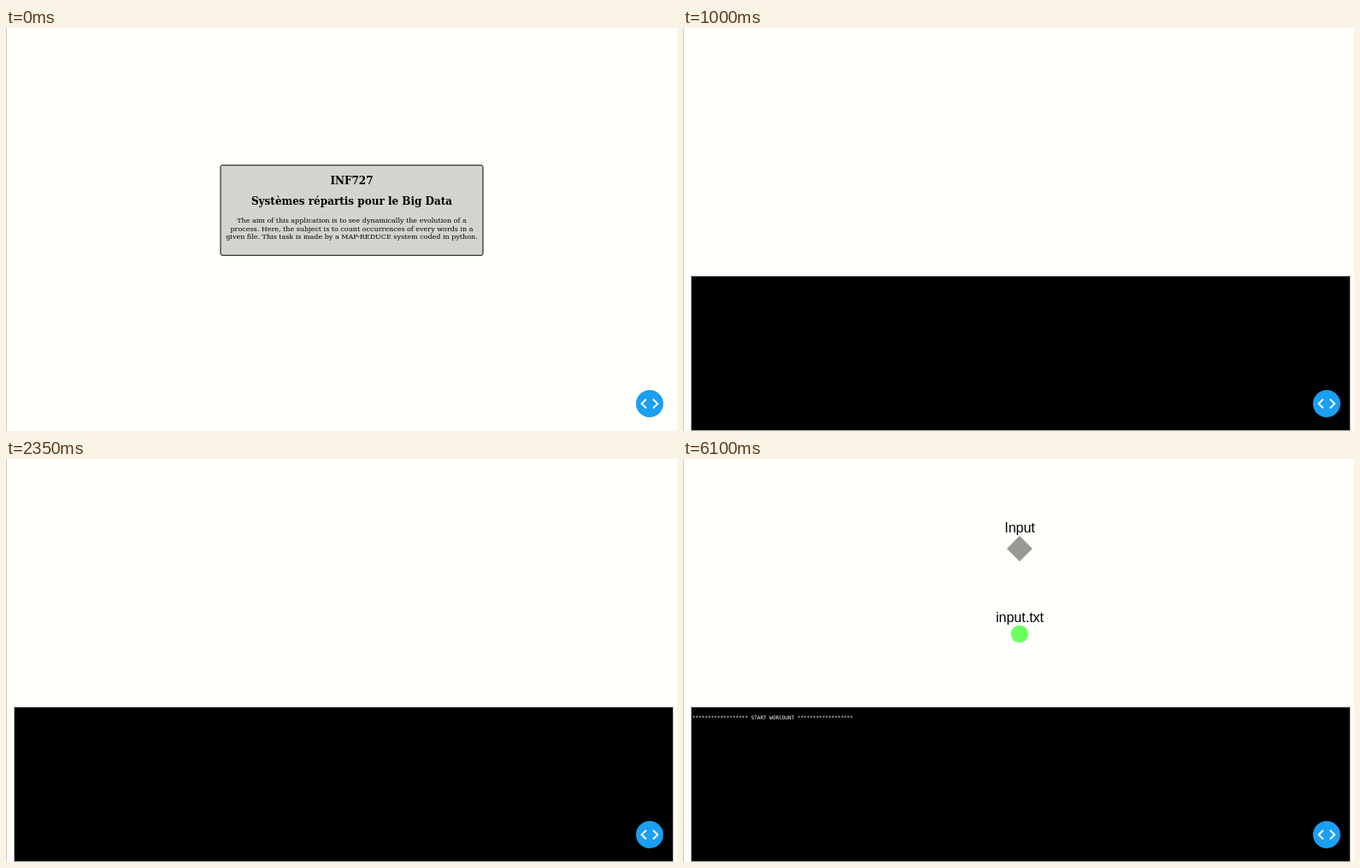
Recreate the animation shown at these times as an HTML page. Size 785 by 472 pixels, loop 8 s.

```html
<!DOCTYPE html>
<html lang="en">
<head>
<meta charset="utf-8">
<title>Word count</title>
<style>
  html, body { margin: 0; width: 100%; height: 100%; overflow: hidden; background: #fffffb; }
  svg { display: block; }
  #card { font: 8px "DejaVu Serif", serif; text-anchor: middle; }
  #card .head { font-size: 12px; font-weight: bold; }
  #graph { font: 16px "Liberation Sans", Arial, sans-serif; text-anchor: middle; }
  #log { font: 6px "DejaVu Sans Mono", monospace; fill: #fff; }
</style>
</head>
<body>
<svg width="785" height="472" viewBox="0 0 785 472">
  <path d="M.5 0V472" stroke="#ccccc8"/>

  <g id="card">
    <rect x="251" y="160.75" width="307" height="105.5" rx="2" fill="#d3d3cf" stroke="#000"/>
    <text class="head" x="404.5" y="183">INF727</text>
    <text class="head" x="404.5" y="207">Systèmes répartis pour le Big Data</text>
    <text x="404.5" y="228">The aim of this application is to see dynamically the evolution of a</text>
    <text x="404.5" y="237.5">process. Here, the subject is to count occurrences of every words in a</text>
    <text x="404.5" y="247">given file. This task is made by a MAP-REDUCE system coded in python.</text>
  </g>

  <rect id="console" x="9.5" y="290.5" width="771" height="181" stroke="#b4b4b0"/>

  <g id="run">
    <g id="graph">
      <text x="394" y="86">Input</text>
      <path d="M393.8 90l15 15-15 15-15-15z" fill="#999994"/>
      <text x="394" y="191">input.txt</text>
      <circle cx="393.8" cy="205" r="10.2" fill="#6bff61"/>
    </g>
    <text id="log" x="11" y="305">****************** START WORCOUNT ******************</text>
  </g>

  <circle cx="753" cy="440" r="16" fill="#1a9ff2"/>
  <path d="M749 434.7l-5.3 5.3 5.3 5.3M757 434.7l5.3 5.3-5.3 5.3" fill="none" stroke="#fff" stroke-width="2"/>
</svg>
<script>
  const LOOP = 8000, OPEN = 1000, START = 3250;
  const show = (id, on) => {
    document.getElementById(id).style.display = on ? "" : "none";
  };

  function draw(now) {
    const t = now % LOOP;
    show("card", t < OPEN);
    show("console", t >= OPEN);
    show("run", t >= START);
  }

  const begin = performance.now();
  function tick() {
    draw(performance.now() - begin);
    requestAnimationFrame(tick);
  }
  tick();
</script>
</body>
</html>
```
